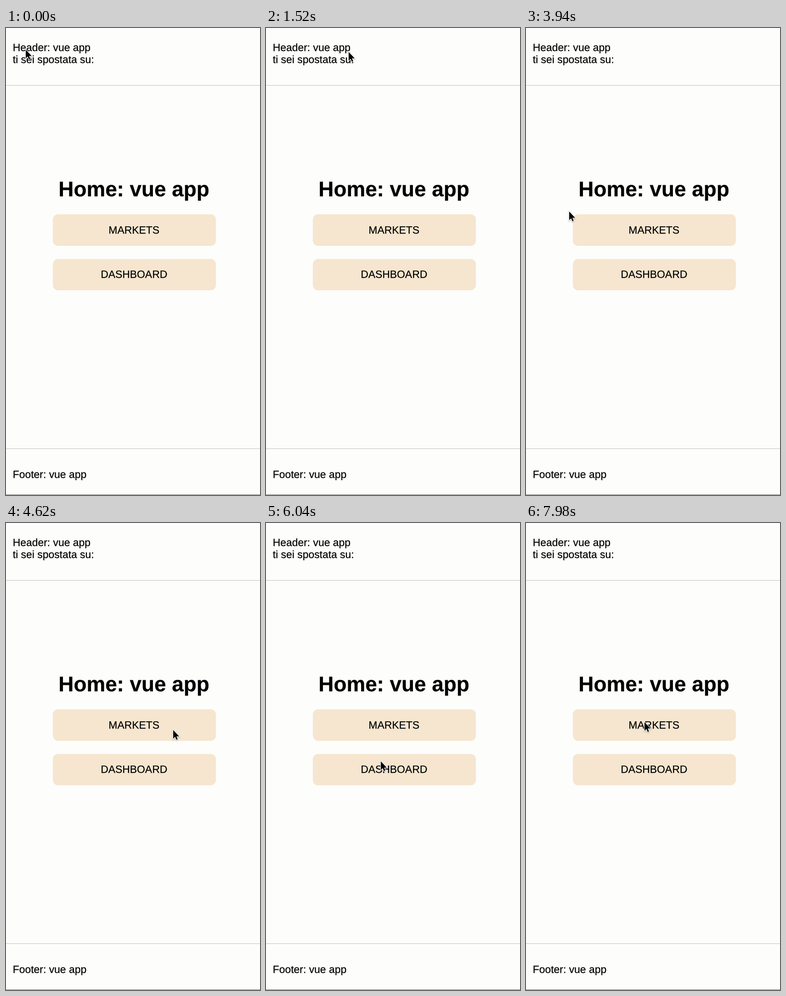
These frames come from a looping animation (553x1013 px, 8000 ms). An HTML page:

```html
<!DOCTYPE html>
<html lang="it">
<head>
<meta charset="utf-8">
<title>vue app</title>
<style>
  html, body { margin: 0; width: 100%; height: 100%; overflow: hidden; background: #fdfdfc; }
  svg { display: block; font: 22.9px "Liberation Sans", Arial, sans-serif; }
  text { text-rendering: geometricPrecision; stroke: #000; stroke-width: .25; }
  .middle { text-anchor: middle; }
  .title { font-size: 2em; font-weight: bold; }
  .button { fill: #f6e6cf; }
  .rule { fill: #c0c0c2; }
  #cursor { filter: drop-shadow(0 1.5px 1.2px rgba(0, 0, 0, .35)); }
</style>
</head>
<body>
<svg width="553" height="1013" viewBox="0 0 553 1013">
  <rect class="rule" y="124" width="553" height="1"/>
  <rect class="rule" y="912" width="553" height="1"/>
  <rect y="1012" width="553" height="1" fill="#66665f"/>

  <text x="14.8" y="49.5">Header: vue app</text>
  <text x="14.8" y="75.5">ti sei spostata su:</text>
  <text x="14.8" y="976">Footer: vue app</text>
  <text class="middle title" x="278.5" y="365">Home: vue app</text>

  <rect class="button" x="102" y="404" width="355" height="68.5" rx="11.5"/>
  <rect class="button" x="102" y="501" width="355" height="68" rx="11.5"/>
  <text class="middle" x="278.7" y="446">MARKETS</text>
  <text class="middle" x="278.7" y="542">DASHBOARD</text>

  <path id="cursor" d="M0 0V18.8L4.2 14.8L7 21.3L9.8 20.1L7.1 13.7H13Z"
        stroke="#fff" stroke-width="2.4" paint-order="stroke"/>
</svg>
<script>
  const LOOP = 8000, STEP = 20, GLIDE = 720;
  const cursor = document.getElementById('cursor');

  // Each glide: when it starts and where the pointer comes to rest.
  const start = { x: 43, y: 47 };
  const glides = [
    { at: 0, x: 102, y: 101 },
    { at: 840, x: 180, y: 52 },
    { at: 2380, x: 188, y: 247 },
    { at: 3200, x: 94, y: 398 },
    { at: 4040, x: 366, y: 449 },
    { at: 4880, x: 306, y: 485 },
    { at: 5720, x: 238, y: 524 },
    { at: 6600, x: 268, y: 413 },
    { at: 7560, x: 257, y: 433 }
  ];

  const easeOut = u => 1 - (1 - u) ** 3;

  function pointerAt(time) {
    const i = glides.findLastIndex(glide => glide.at <= time);
    const from = glides[i - 1] || start, to = glides[i];
    const k = easeOut(Math.min(1, (time - to.at) / GLIDE));
    return [from.x + (to.x - from.x) * k, from.y + (to.y - from.y) * k];
  }

  function draw() {
    const time = Math.floor(performance.now() % LOOP / STEP) * STEP;
    const [x, y] = pointerAt(time).map(Math.round);
    cursor.setAttribute('transform', `translate(${x} ${y})`);
    requestAnimationFrame(draw);
  }
  draw();
</script>
</body>
</html>
```
